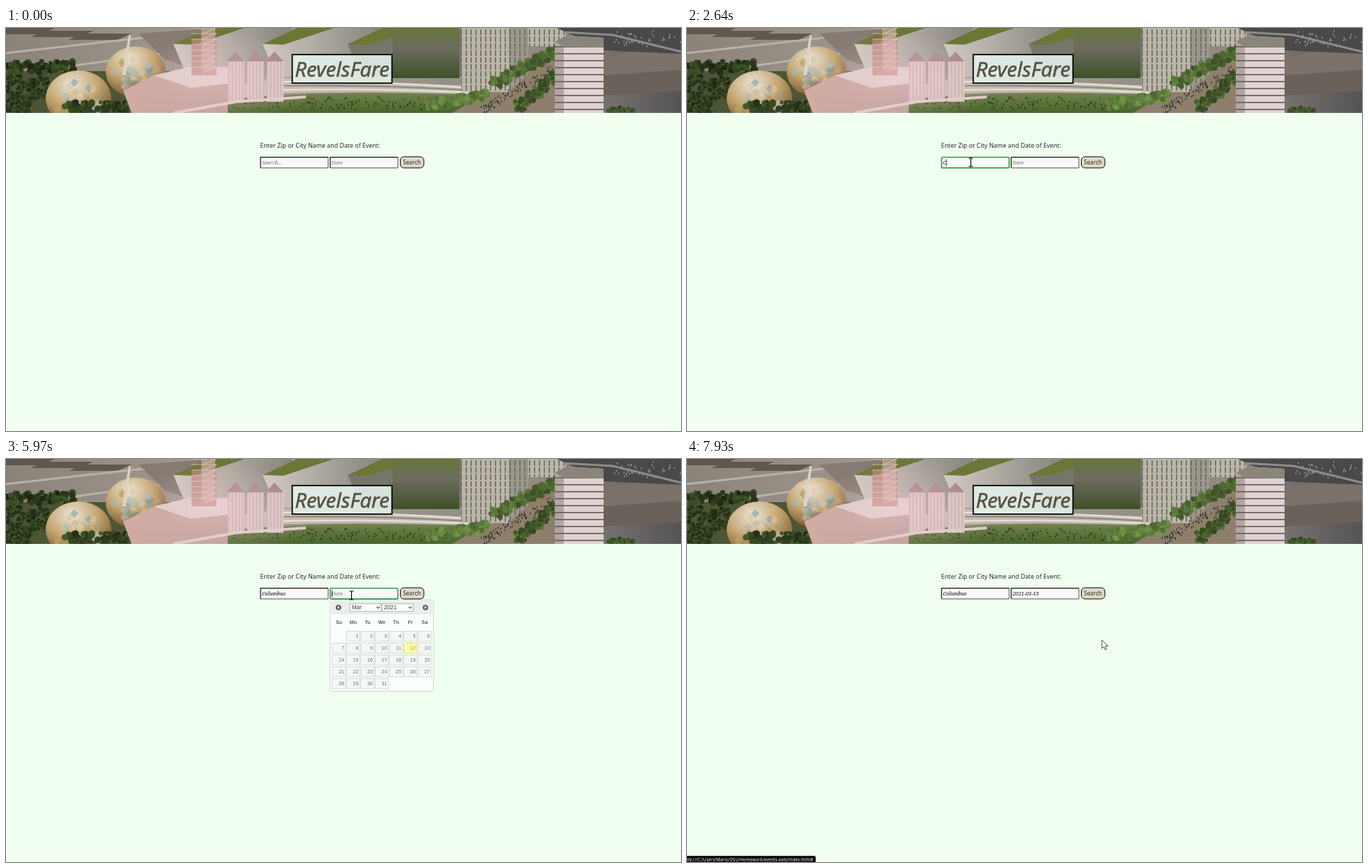
Recreate the animation shown at these times as an HTML page. Size 968 px wide and 579 px high, loop 8 s.

```html
<!DOCTYPE html>
<html lang="en">
<head>
<meta charset="utf-8">
<title>RevelsFare</title>
<style>
html, body { margin: 0; width: 100%; height: 100%; overflow: hidden; background: #f0fff0; }
svg { display: block; width: 968px; height: 579px; }
text { font-family: "Noto Sans", sans-serif; fill: #2c2a26; white-space: pre; }
.field { font: italic 7.35px "Noto Serif", serif; fill: #000; }
.hint { fill: #767670; }
#calendar text { font: 7.2px "Liberation Sans", Arial, sans-serif; fill: #454545; }
#calendar .day-name { font-weight: bold; fill: #333; text-anchor: middle; }
#calendar .pick { font-size: 8.2px; fill: #000; }
#calendar .num { text-anchor: end; }
#calendar .today { fill: #777620; }
</style>
</head>
<body>
<svg viewBox="0 0 968 579">
  <defs>
    <clipPath id="banner"><rect width="968" height="122"/></clipPath>
    <linearGradient id="ground"><stop offset="0" stop-color="#8b837a"/><stop offset=".35" stop-color="#a59e95"/><stop offset=".8" stop-color="#8f8983"/><stop offset="1" stop-color="#555354"/></linearGradient>
    <linearGradient id="lawn" x2="0" y2="1"><stop offset="0" stop-color="#71824a"/><stop offset="1" stop-color="#48632a"/></linearGradient>
    <linearGradient id="glass" x2="0" y2="1"><stop offset="0" stop-color="#66763a"/><stop offset=".4" stop-color="#6d6c5f"/><stop offset="1" stop-color="#3d5128"/></linearGradient>
    <linearGradient id="wall"><stop offset="0" stop-color="#d0cac1"/><stop offset="1" stop-color="#87847d"/></linearGradient>
    <linearGradient id="mill"><stop offset="0" stop-color="#d3aca4"/><stop offset="1" stop-color="#b99c97"/></linearGradient>
    <radialGradient id="dome" cx=".4" cy=".25" r=".8"><stop offset="0" stop-color="#ece6da"/><stop offset=".5" stop-color="#c3a570"/><stop offset="1" stop-color="#6b4d26"/></radialGradient>
    <radialGradient id="veil"><stop stop-color="#ffd3da" stop-opacity=".4"/><stop offset="1" stop-color="#ffd3da" stop-opacity="0"/></radialGradient>
    <pattern id="windows" width="7" height="10" patternUnits="userSpaceOnUse"><path d="M0 0H7V10H0z" fill="#bbb6a9"/><path d="M2 2V10" stroke="#77746b" stroke-width="2"/></pattern>
    <pattern id="floors" width="80" height="10" patternUnits="userSpaceOnUse"><path d="M0 0H80V10H0z" fill="#ded3d1"/><path d="M0 7H80" stroke="#796c6b" stroke-width="2.2"/></pattern>
    <pattern id="staves" width="5" height="9" patternUnits="userSpaceOnUse"><path d="M0 0H5V9H0z" fill="#cbb3b1"/><path d="M2 0V9" stroke="#eadfdd"/></pattern>
    <filter id="soft"><feGaussianBlur stdDeviation=".55"/></filter>
    <filter id="shadow"><feDropShadow dx="0" dy="1" stdDeviation=".8" flood-opacity=".35"/></filter>
  </defs>
  <g clip-path="url(#banner)"><g id="photo" filter="url(#soft)"></g></g>

  <rect x="410.5" y="38.2" width="143" height="41" fill="#e4f3ec" fill-opacity=".88" stroke="#000" stroke-width="1.8"/>
  <text x="482" y="69.5" text-anchor="middle" style="font-size:29.3px;font-style:italic;fill:#57503f;stroke:#57503f;stroke-width:.5">RevelsFare</text>

  <text x="364.5" y="172" style="font-size:8.83px">Enter Zip or City Name and Date of Event:</text>
  <g id="fields"></g>
  <rect x="565.5" y="185" width="33.7" height="16" rx="5" fill="#dfd9c9" stroke="#000"/>
  <text x="582.2" y="196.3" text-anchor="middle" style="font-size:8.2px">Search</text>

  <g id="suggestions" style="font-size:6.45px">
    <rect x="365" y="202" width="150.5" height="48" rx="1" fill="#fff" filter="url(#shadow)"/>
    <text x="371" y="219">2001:0db8:f481:cf00:9cfb:5525:136b:9d6e</text>
    <text x="371" y="238.6">JAVA</text>
  </g>
  <g id="calendar"></g>
  <g id="status">
    <path d="M0 570.3H182.5a2 2 0 0 1 2 2V579H0z"/>
    <text x="0" y="578" style="font-size:6.2px;fill:#fff">ile:///C:/Users/Marlo/OSU/Homework/events-eats/index.html#</text>
  </g>

  <g id="cursor" stroke-linejoin="round">
    <circle id="click" r="10.5" fill="#fff02c" opacity=".62"/>
    <path id="arrow" d="M0 0V12.2L2.8 9.6 4.7 14 6.8 13.1 4.9 8.8H8.8z" fill="#fff" stroke="#222" stroke-width=".8"/>
    <path id="beam" d="M-3-6H3M0-6V6M-3 6H3" fill="none" stroke="#000" stroke-width="1.2"/>
    <path id="hand" d="M-1.4 1Q0-1 1.3 1V6Q3 5 4 6.5 5.5 5.8 6.2 7.2 8 6.6 8 8.5V12.5L6.5 17.5H-.3L-4.6 11.5Q-4.8 9.2-2.6 10L-1.4 11.2z" fill="#fff" stroke="#222" stroke-width=".9"/>
  </g>
</svg>
<script>
const $ = id => document.getElementById(id);
const LOOP = 8000;

let seed = 11;
const rand = (a, b) => a + (b - a) * ((seed = seed * 16807 % 2147483647) / 2147483647);
const times = (n, draw) => Array.from({ length: n }, (_, i) => draw(i)).join('');
const rect = (x, y, w, h, fill, extra = '') => `<rect x="${x}" y="${y}" width="${w}" height="${h}" fill="${fill}" ${extra}/>`;
const shape = (d, fill) => `<path d="${d}" fill="${fill}"/>`;
const line = (d, color, width) => `<path d="${d}" fill="none" stroke="${color}" stroke-width="${width}"/>`;

const tree = (x, y, r, light) => times(14, () =>
  `<circle cx="${x + rand(-r, r) * .8}" cy="${y + rand(-r, r) * .8}" r="${r * rand(.25, .5)}" fill="hsl(88 ${rand(28, 42)}% ${light + rand(-7, 8)}%)"/>`);
const treeRow = (n, x, y, dx, dy, r, light) => times(n, i => tree(x + i * dx, y + i * dy, r, light));
const specks = (n, x0, x1, y0, y1, slope, color) => times(n, () => {
  const x = rand(x0, x1);
  return rect(x, rand(y0, y1) + (x - x0) * slope, 1.2, 2.6, color);
});
const dome = (cx, cy, r) => `<ellipse cx="${cx}" cy="${cy}" rx="${r}" ry="${r * .85}" fill="url(#dome)"/>` +
  times(30, () => {
    const a = rand(0, 6.3), d = r * rand(.1, .8), tone = rand(0, 1);
    return shape(`M${cx + d * Math.cos(a)} ${cy + d * .8 * Math.sin(a)}l7 5-6 7-6-6z`, `hsl(${tone > .5 ? 40 : 190} ${tone * 50}% ${rand(45, 85)}% / .5)`);
  });
const silo = i => shape(`M${316 + i * 28} 48l13-14 13 14z`, '#a58683') + rect(318 + i * 28, 48, 24, 58, 'url(#staves)');
// a planted roof running up to the right, with the wall under its near edge
const hall = (x, wall) => shape(`M${x} 23L${x + 70} 0h100V70H${x + 20}z`, wall) + shape(`M${x} 23L${x + 50} 0h52l-72 24z`, '#6c7635');

const photo = () => rect(0, 0, 968, 122, 'url(#ground)') +
  times(3, i => shape(`M${i * 55} ${i * 4}h70l-20 9h-70z`, '#61574e')) +
  line('M0 36L250 8M40 62L270 30', '#b9b2a8', 3) +
  shape('M190 8L300 0V70L228 45z', '#867b72') +
  shape('M0 62H260V122H0z', '#4c5535') + treeRow(6, 8, 56, 17, 0, 10, 17) +
  dome(186, 63, 43) + shape('M176 10h3L172 68h-6z', '#ddd3bd') +
  times(50, () => tree(rand(0, 65), rand(70, 120), 5, 17)) +
  dome(104, 101, 47) + treeRow(7, 92, 114, 17, 0, 10, 19) +
  hall(240, 'url(#wall)') + hall(368, 'url(#wall)') + hall(490, '#77766b') +
  rect(554, 0, 96, 72, 'url(#glass)') +
  shape('M310 84L400 72 690 84V122H310z', '#c2baae') +
  times(4, i => line(`M395 ${77 + i * 6}Q540 ${76 + i * 5} 690 ${88 + i * 3}`, i % 2 ? '#8d867c' : '#ebe4da', 2)) +
  shape('M300 104Q450 88 690 97V122H300z', 'url(#lawn)') + specks(130, 320, 620, 98, 116, 0, '#26301c') +
  shape('M168 90L212 68 318 74V122H180z', 'url(#mill)') + shape('M212 68L262 56H335V78L265 86z', '#dccdc9') +
  rect(266, 16, 36, 52, '#bd8078', 'opacity=".7"') + rect(280, 0, 20, 60, '#d8b4b0', 'opacity=".6"') +
  times(8, i => line(`M266 ${i * 8}h36l-20 8`, '#e3c9c6', .8)) +
  times(3, silo) + line('M240 122L330 106 430 99', '#ddcbc8', 4) +
  '<ellipse cx="310" cy="75" rx="130" ry="70" fill="url(#veil)"/>' +
  shape('M640 122L740 62 800 20V122z', '#8d7f6b') +
  rect(748, 0, 55, 26, 'url(#windows)') + shape('M653 0H749V66L721 92H653z', 'url(#windows)') + shape('M721 0H749V66L721 92z', '#6b695f66') +
  specks(90, 680, 785, 112, 126, -.6, '#2d2c28') +
  treeRow(10, 702, 77, 10, -5, 9, 30) + treeRow(7, 738, 112, 8, -7, 9, 25) + treeRow(9, 611, 110, 9.5, -1.5, 9, 36) +
  shape('M790 0H968V38L858 32z', '#4a494a') + specks(40, 870, 968, 2, 26, 0, '#a5a3a0') +
  line('M800 6L870 10 968 34', '#8f8c89', 3) +
  shape('M856 44L895 34 968 37V90L856 97z', '#7c726a') + shape('M856 68L968 60V90L856 97z', '#6a615a') +
  treeRow(4, 868, 119, 9, 0, 6, 24) +
  shape('M787 20L803 11 857 14V122H787z', 'url(#floors)') + shape('M787 20L803 11 857 14V28L800 27z', '#8b847a') + shape('M787 20L800 27V122H787z', '#6d606066');

const INPUTS = { city: [365, 'Search...'], date: [465, 'Date'] };
const field = (id, x) => rect(x, 185.5, 97, 15.7, '#f8f8f7') +
  `<g id="${id}Border">${line(`M${x} 201V185.6h97`, '#111', 1.2)}${line(`M${x} 201h97V185.6`, '#4c4c4c', 1)}</g>` +
  rect(x, 185.6, 97, 15.4, 'none', `id="${id}Focus" rx="1.5" stroke="#1b8a2b" stroke-width="1.4"`) +
  `<text id="${id}Text" x="${x + 2}" y="196.2"></text>` + rect(0, 188.5, .8, 10, '#000', `id="${id}Caret"`);

const GRID = { x: 468, y: 247.5, dx: 20.5, dy: 17 };
const select = (x, label) => rect(x, 208, 45, 11, '#fff', 'stroke="#767676" stroke-width=".7"') +
  `<text class="pick" x="${x + 3}" y="216.3">${label}</text>` + line(`M${x + 38.5} 212.2l2.2 2.3 2.2-2.3`, '#111', 1.1);
const arrowButton = (x, dir) => `<circle cx="${x}" cy="213.3" r="3.9" fill="#333"/>` + shape(`M${x + 2 * dir} 213.3l${-3 * dir}-2.3v4.6z`, '#fff');
const dayCell = day => {
  const x = GRID.x + day % 7 * GRID.dx, y = GRID.y + Math.floor(day / 7) * GRID.dy, today = day === 12;
  return rect(x, y, 19, 14.5, today ? '#fffa90' : '#f6f6f6', `id="day${day}" stroke="${today ? '#dad55e' : '#c5c5c5'}" stroke-width=".8"`) +
    `<text class="num ${today ? 'today' : ''}" x="${x + 17}" y="${y + 9.8}">${day}</text>`;
};
const calendar = () => rect(464.9, 202.5, 148, 131, '#fff', 'rx="1.5" stroke="#c5c5c5"') +
  rect(467, 204.3, 144, 18.6, '#e9e9e9', 'rx="1.5" stroke="#ddd" stroke-width=".6"') +
  arrowButton(476.8, -1) + arrowButton(601.5, 1) + select(493, 'Mar') + select(539, '2021') +
  ['Su', 'Mo', 'Tu', 'We', 'Th', 'Fr', 'Sa'].map((name, i) =>
    `<text class="day-name" x="${GRID.x + 9.5 + i * GRID.dx}" y="237.4">${name}</text>`).join('') +
  times(31, i => dayCell(i + 1));

$('photo').innerHTML = photo();
$('fields').innerHTML = Object.entries(INPUTS).map(([id, [x]]) => field(id, x)).join('');
$('calendar').innerHTML = calendar();

const TICK = 77, BLINK = 545, KEY_GAP = 210, PRESS = 160;
const CITY_CLICK = 1080, CITY_FOCUS = 1170, TYPING = 2640, DATE_FOCUS = 5740, PICK = 7240, PICKED = 7400, LEAVE = 7930;
const WORD = 'Columbus';
const MOVES = [
  { from: 100, to: 910, x: 407, y: 193 },
  { from: 5200, to: 5660, x: 495.5, y: 196 },
  { from: 6210, to: 6680, x: 565, y: 273.5 },
  { from: 6680, to: PICK, x: 598, y: 271.5 },
  { from: PICKED, to: LEAVE, x: 595, y: 260 }
];
const clamp = v => Math.max(0, Math.min(1, v));
const stepped = (t, from, to) => t >= to ? 1 : clamp(Math.floor((t - from) / TICK) * TICK / (to - from));
const pressed = (t, at) => t >= at && t < at + PRESS;
const show = (id, on) => $(id).style.display = on ? '' : 'none';

function pointer(t) {
  let x = 873, y = 556;
  for (const move of MOVES) {
    const k = stepped(t, move.from, move.to), eased = k * k * (3 - 2 * k);
    x += (move.x - x) * eased;
    y += (move.y - y) * eased;
  }
  return [x, y];
}

function setField(id, value, focused, idle) {
  const label = $(id + 'Text'), [x, hint] = INPUTS[id];
  label.textContent = value || hint;
  label.setAttribute('class', value ? 'field' : 'field hint');
  show(id + 'Focus', focused);
  show(id + 'Border', !focused);
  show(id + 'Caret', focused && Math.floor(idle / BLINK) % 2 === 0);
  $(id + 'Caret').setAttribute('x', x + 2 + (value ? label.getComputedTextLength() : 0));
}

function render(t) {
  const [x, y] = pointer(t);
  const typed = Math.max(0, Math.min(WORD.length, Math.floor((t - TYPING) / KEY_GAP) + 1));
  const lastInput = typed ? TYPING + (typed - 1) * KEY_GAP : CITY_FOCUS;
  setField('city', WORD.slice(0, typed), t >= CITY_FOCUS && t < DATE_FOCUS, t - lastInput);
  setField('date', t >= PICKED ? '2021-03-13' : '', t >= DATE_FOCUS && t < PICK, t - DATE_FOCUS);
  show('suggestions', t >= CITY_FOCUS && t < TYPING);
  show('status', t >= PICKED + TICK);

  const opacity = stepped(t, DATE_FOCUS, DATE_FOCUS + 300) - stepped(t, PICKED, PICKED + 230);
  show('calendar', opacity > 0);
  $('calendar').style.opacity = opacity;

  const overDays = t >= DATE_FOCUS && t < LEAVE && y >= GRID.y;
  const overInput = y < 202 && x < 562;
  const hovered = overDays && Math.floor((y - GRID.y) / GRID.dy) * 7 + Math.floor((x - GRID.x) / GRID.dx);
  for (let day = 1; day <= 31; day++) {
    if (day !== 12) $('day' + day).setAttribute('fill', day === hovered ? '#ededed' : '#f6f6f6');
  }

  show('cursor', t >= MOVES[0].from);
  show('beam', overInput);
  show('hand', overDays);
  show('arrow', !overInput && !overDays);
  show('click', [CITY_CLICK, DATE_FOCUS, PICK].some(at => pressed(t, at)));
  $('cursor').setAttribute('transform', `translate(${x} ${y})`);
}

const start = performance.now();
(function frame() {
  render((performance.now() - start) % LOOP);
  requestAnimationFrame(frame);
})();
</script>
</body>
</html>
```
